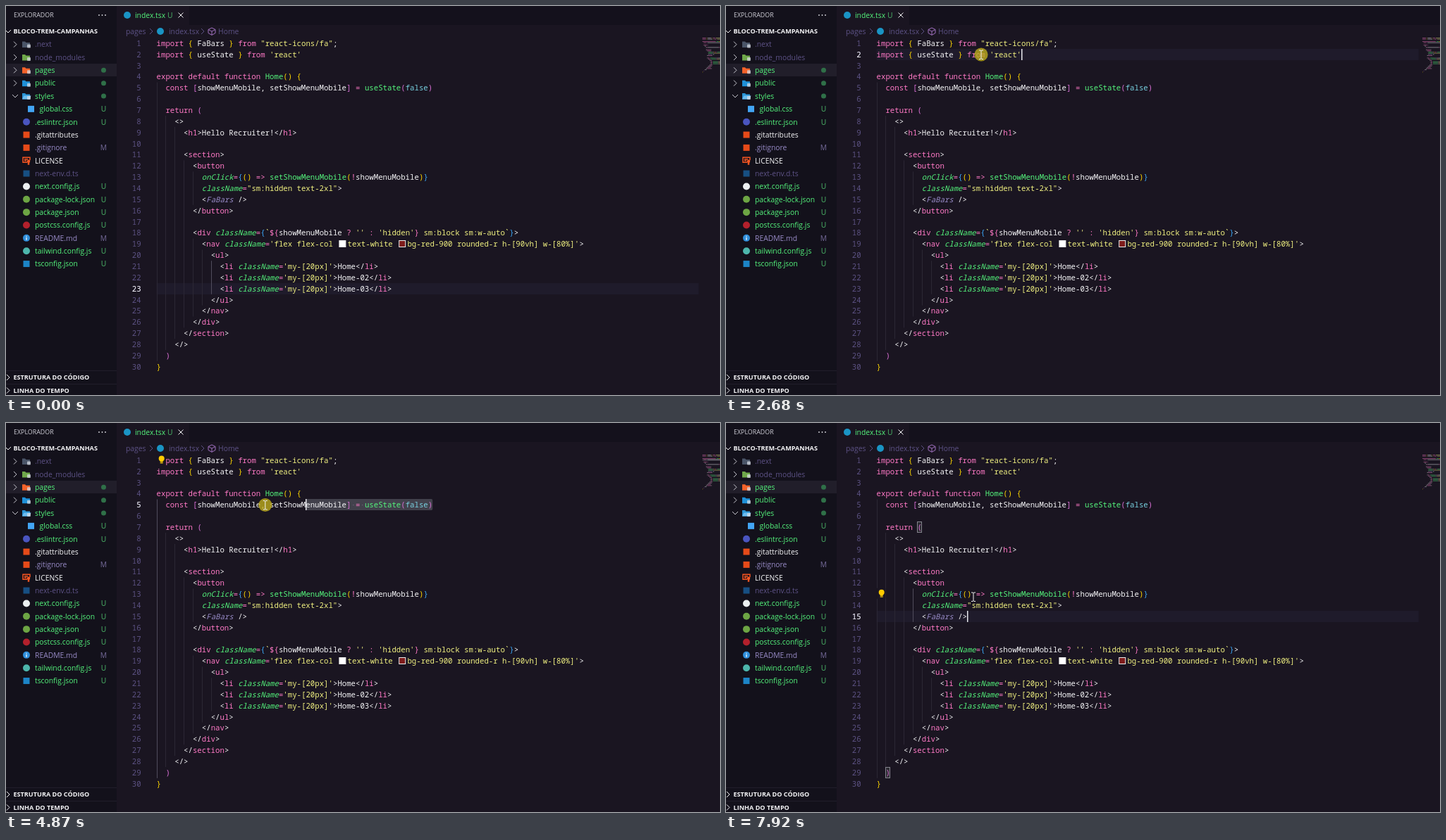
Write an HTML page that moves like this. It is 1013 px wide and 553 px high and loops after 7990 ms.

```html
<!DOCTYPE html>
<html lang="pt">
<head>
<meta charset="utf-8">
<style>
html, body { margin: 0; width: 100%; height: 100%; overflow: hidden; background: #1a1521; }
svg { display: block; width: 1013px; height: 553px; }
text { white-space: pre; font: 10.35px "Open Sans", "Noto Sans", sans-serif; }
.code { font: 500 10.7px "Noto Sans Mono", "DejaVu Sans Mono", monospace; }
.italic { font-style: italic; }
.head { font-size: 9.1px; font-weight: 700; }
.small { font-size: 8.9px; }
</style>
</head>
<body>
<svg id="stage" viewBox="0 0 1013 553"></svg>
<!-- Each ~ starts a token; the letter after it is its colour. -->
<script type="text/plain" id="code">~pimport ~1{ ~wFaBars ~1} ~pfrom ~y"react-icons/fa"~w;
~pimport ~1{ ~wuseState ~1} ~pfrom ~y'react'

~pexport default function ~gHome~1() {
  ~pconst ~2[~wshowMenuMobile, setShowMenuMobile~2] ~p= ~guseState~2(~bfalse~2)

  ~preturn ~2(
    ~w<>
      ~w<~ph1~w>Hello Recruiter!</~ph1~w>

      ~w<~psection~w>
        ~w<~pbutton
          ~aonClick~p=~3{~1() ~p=> ~gsetShowMenuMobile~1(~p!~wshowMenuMobile~1)~3}
          ~aclassName~p=~y"sm:hidden text-2xl"~w>
          ~w<~cFaBars ~w/>
        ~w</~pbutton~w>

        ~w<~pdiv ~aclassName~p=~3{~y`~p${~wshowMenuMobile ~p? ~y'' ~p: ~y'hidden'~p} ~ysm:block sm:w-auto`~3}~w>
          ~w<~pnav ~aclassName~p=~y'flex flex-col ~W~ytext-white ~R~ybg-red-900 rounded-r h-[90vh] w-[80%]'~w>
            ~w<~pul~w>
              ~w<~pli ~aclassName~p=~y'my-[20px]'~w>Home</~pli~w>
              ~w<~pli ~aclassName~p=~y'my-[20px]'~w>Home-02</~pli~w>
              ~w<~pli ~aclassName~p=~y'my-[20px]'~w>Home-03</~pli~w>
            ~w</~pul~w>
          ~w</~pnav~w>
        ~w</~pdiv~w>
      ~w</~psection~w>
    ~w</>
  ~2)
~1}</script>
<script>
const LOOP = 7990, LAG = 160;
const LEFT = 213.6, CHAR = 6.42, TOP = 53, ROW = 15.86;
const EDITOR = '#1a1521', SIDE = '#13111b', DIM = '#5d5286', GREEN = '#54f47c', STATUS = '#4cb869', WHITE = '#f4f4f6';
const COLORS = { p: '#ff79c6', w: WHITE, y: '#f0f080', g: GREEN, a: GREEN, b: '#78d1e1', c: '#988bc7',
  1: '#ffd700', 2: '#da70d6', 3: '#3aa6f5' };
const SWATCHES = { W: '#ffffff', R: '#7f1d1d' };

const lines = document.getElementById('code').textContent.split('\n');
const plain = lines.map(line => line.replace(/~./g, ''));
const colX = col => LEFT + col * CHAR;
const rowY = line => TOP + (line - 1) * ROW;

const rect = (x, y, w, h, fill, extra = '') =>
  `<rect x="${x}" y="${y}" width="${w}" height="${h}" fill="${fill}" ${extra}/>`;
const rowRect = (x, line, w, fill, extra) => rect(x, Math.round(rowY(line) - 8), w, 16, fill, extra);
const circle = (x, y, r, fill, extra = '') => `<circle cx="${x}" cy="${y}" r="${r}" fill="${fill}" ${extra}/>`;
const stroke = (d, color, width = 1) => `<path d="${d}" fill="none" stroke="${color}" stroke-width="${width}"/>`;
const text = (x, y, str, fill, cls = '', extra = '') =>
  `<text x="${x}" y="${Math.round(y + 3.8)}" fill="${fill}" class="${cls}" ${extra}>${str.replace(/&/g, '&amp;').replace(/</g, '&lt;')}</text>`;
const chevron = (x, y, color, down) =>
  stroke(down ? `M${x - 4} ${y - 2}l4 4l4 -4` : `M${x - 2} ${y - 4}l4 4l-4 4`, color);
const number = (line, color) => text(191.7, rowY(line), String(line), color, 'code', 'text-anchor="end"');

// Sidebar: label, label colour, icon kind, icon colour, git state
const tree = [
  ['.next', DIM, 'folder', '#4a5568'],
  ['node_modules', DIM, 'folder', '#6fa84a'],
  ['pages', GREEN, 'folder', '#f4622a', '•'],
  ['public', GREEN, 'folder', '#1e90d8', '•'],
  ['styles', GREEN, 'open', '#2b95d6', '•'],
  ['global.css', GREEN, 'square', '#42a5f5', 'U'],
  ['.eslintrc.json', GREEN, 'circle', '#4a55c0', 'U'],
  ['.gitattributes', WHITE, 'square', '#e64a19'],
  ['.gitignore', '#988bc7', 'square', '#e64a19', 'M'],
  ['LICENSE', WHITE, 'award', '#ff5722'],
  ['next-env.d.ts', DIM, 'square', '#174f82'],
  ['next.config.js', GREEN, 'circle', '#eceff1', 'U'],
  ['package-lock.json', GREEN, 'circle', '#6da544', 'U'],
  ['package.json', GREEN, 'circle', '#6da544', 'U'],
  ['postcss.config.js', GREEN, 'circle', '#b3202c', 'U'],
  ['README.md', '#988bc7', 'info', '#2f8fdc', 'M'],
  ['tailwind.config.js', GREEN, 'circle', '#4db6ac', 'U'],
  ['tsconfig.json', GREEN, 'square', '#1c84c6', 'U']
];

function icon(kind, x, y, color) {
  if (kind === 'square') return rect(x - 4.5, y - 4.5, 9, 9, color);
  if (kind === 'circle') return circle(x, y, 5, color);
  if (kind === 'info') return circle(x, y, 5, color) + rect(x - .6, y - 1, 1.2, 4, '#fff') + rect(x - .6, y - 3, 1.2, 1.2, '#fff');
  if (kind === 'award') return stroke(`M${x + 1} ${y + 2.5}h-6v-7h10v4M${x - 3} ${y - 2}h5M${x - 3} ${y}h3`, color, 1.4) +
    circle(x + 3, y + 1, 2.2, color) + rect(x + 1.8, y + 2, 2.4, 4, color);
  const folder = `<path d="M${x - 6} ${y - 4}h4l1.5 1.5h5.5v7h-11z" fill="${color}"/>`;
  const front = kind === 'open' ? `<path d="M${x - 6} ${y + 4.5}l2.5 -5h10l-2 5z" fill="#6dbdf0"/>` : '';
  return folder + front + rect(x + 1, y, 5, 5, '#d8dde6', 'opacity=".75" rx="1"');
}

function sidebar() {
  let out = rect(0, 0, 157, 553, SIDE) + rect(0, 82, 157, 18, '#211e2a') +
    text(11, 12.5, 'EXPLORADOR', '#d0d0d8', 'small') + [132, 136.5, 141].map(x => circle(x, 13, .9, '#d8d8df')).join('') +
    chevron(3, 36, WHITE, true) + text(10.5, 35.5, 'BLOCO-TREM-CAMPANHAS', WHITE, 'head') +
    rect(0, 518, 157, 1, '#211e2b') + rect(0, 537, 157, 1, '#211e2b') +
    chevron(3, 528, WHITE) + text(10.5, 527.5, 'ESTRUTURA DO CÓDIGO', WHITE, 'head') +
    chevron(3, 546.5, WHITE) + text(10.5, 546, 'LINHA DO TEMPO', WHITE, 'head');
  tree.forEach(([label, color, kind, tint, git], i) => {
    const y = 54.6 + i * 18.35, nested = i === 5 ? 6.5 : 0;
    if (i < 5) out += chevron(13, y, '#c8c8d0', i === 4);
    out += icon(kind, 29 + nested, y, tint) + text(41 + nested, y, label, color);
    if (git === '•') out += circle(138.5, y, 3.5, '#2f7048');
    else if (git) out += text(138.5, y, git, git === 'U' ? STATUS : '#746a99', '', 'text-anchor="middle"');
  });
  return out;
}

function header() {
  return rect(157, 0, 856, 27, '#14111c') + rect(157, 0, 103, 27, EDITOR) +
    circle(172, 13, 5, '#1a94c4') + text(183, 13, 'index.tsx', GREEN) + text(229, 13, 'U', STATUS) +
    stroke('M244.5 9.5l7 7m0 -7l-7 7', WHITE) +
    text(170, 36, 'pages', DIM) + chevron(206, 36, DIM) + circle(219, 36, 5, '#1a94c4') +
    text(231, 36, 'index.tsx', DIM) + chevron(279, 36, DIM);
}

function codeText() {
  let out = '', map = '';
  lines.forEach((line, i) => {
    const y = rowY(i + 1), parts = line.split('~');
    let x = LEFT + parts[0].length * CHAR, mapCol = parts[0].length;
    out += number(i + 1, '#5c5283');
    for (const part of parts.slice(1)) {
      const key = part[0], str = part.slice(1);
      if (SWATCHES[key]) {
        out += rect(x + 2.5, Math.round(y) - 4.5, 9, 9, SWATCHES[key], 'stroke="#eee"');
        x += 14.2;
        continue;
      }
      out += text(x, y, str, COLORS[key], 'code' + ('ac'.includes(key) ? ' italic' : ''));
      map += rect(988 + mapCol * .83, 45 + i * 1.67, str.trim().length * .83, 1, COLORS[key], 'opacity=".45"');
      x += str.length * CHAR;
      mapCol += str.length;
    }
  });
  return out + map;
}

// Pointer path: time, x, y
const path = [
  [250, 688, 465], [700, 446, 216], [1000, 553, 265], [1400, 296, 180], [1810, 330, 58], [2160, 424, 64],
  [2280, 424, 64], [2400, 424, 69], [2520, 424, 69], [3060, 216, 69], [3370, 216, 69], [3750, 420, 135],
  [4110, 660, 130], [4270, 612, 117], [4460, 518, 117], [5270, 222, 116], [5980, 222, 116], [6520, 312, 211],
  [6660, 312, 211], [6860, 293, 252], [7080, 346, 275], [7140, 346, 275], [7420, 278, 243], [7520, 278, 243],
  [7660, 346, 275], [7770, 346, 275], [7920, 351, 247], [7990, 351, 247]
];
const presses = [[2420, 3420], [4270, 5650], [6560, 6650], [7120, 7480], [7680, 7760]];
const bulbs = [[3500, 5650, 1], [5650, 6560, 4], [7540, LOOP, 13]];
const guides = [[0, 5, 29], [2, 8, 28], [4, 9, 27], [6, 12, 26], [8, 13, 15], [8, 19, 25], [10, 20, 24], [12, 21, 23]];

function pointer(t) {
  const i = Math.max(1, path.findIndex(p => p[0] >= t));
  const [t0, x0, y0] = path[i - 1], [t1, x1, y1] = path[i];
  const k = Math.max(0, (t - t0) / (t1 - t0));
  return [x0 + (x1 - x0) * k, y0 + (y1 - y0) * k];
}

function textPosition([x, y]) {
  const line = Math.round((y - TOP) / ROW) + 1;
  const col = Math.max(0, Math.min(plain[line - 1].length, Math.round((x - LEFT) / CHAR)));
  return { line, col };
}

function caretState(t) {
  const press = presses.filter(p => p[0] <= t).pop();
  if (!press) return { caret: { line: 23, col: 52 }, anchor: { line: 23, col: 52 }, visible: false };
  const [down, up] = press;
  return {
    anchor: textPosition(pointer(down)),
    caret: textPosition(pointer(Math.max(down, Math.min(t - LAG, up)))),
    visible: true, pressed: t < up
  };
}

function selection(a, b) {
  const [from, to] = a.line < b.line || (a.line === b.line && a.col < b.col) ? [a, b] : [b, a];
  let out = '';
  for (let line = from.line; line <= to.line; line++) {
    const start = line === from.line ? from.col : 0;
    const end = line === to.line ? to.col : plain[line - 1].length + 1;
    out += rowRect(colX(start), line, (end - start) * CHAR, '#42414c', 'rx="2"') +
      rect(988, 45 + (line - 1) * 1.67, 25, 1.67, '#42414c');
    for (let col = start; col < end; col++)
      if (plain[line - 1][col] === ' ') out += rect(colX(col) + 2.7, rowY(line) - .3, 1, 1, '#77748a');
  }
  return out;
}

const box = (line, col) =>
  rect(Math.round(colX(col)) + .5, Math.round(rowY(line)) - 7.5, 6, 15, '#2a2a30', 'stroke="#85838e"');

function bulb(line) {
  const y = rowY(line) - 2.5;
  return rect(LEFT, y - 6, 12.8, 15, EDITOR) + circle(220.7, y, 4, '#ffcc00') +
    rect(218.7, y + 2.5, 4, 2.5, '#ffcc00') + rect(218.7, y + 5.5, 4, 1.5, '#d5ac12');
}

function render(t) {
  const { caret, anchor, visible, pressed } = caretState(t);
  const selected = caret.line !== anchor.line || caret.col !== anchor.col;
  const active = guides.filter(([, from, to]) => from - 1 <= caret.line && caret.line <= to).pop();

  let below = selected ? selection(anchor, caret) : rowRect(LEFT, caret.line, 769, '#1f1b2b');
  for (const guide of guides) {
    const [col, from, to] = guide;
    below += rect(Math.round(colX(col)), rowY(from) - 8, 1, (to - from + 1) * ROW, guide === active ? '#504c5c' : '#2b2734');
  }
  if (t >= 4270 && t < 4700) below += box(5, 54) + box(5, 60);
  if (t >= 6560 && !selected) below += box(7, 9) + box(29, 2);

  let above = number(caret.line, WHITE);
  if (t >= 3500 && t < 4800) above += text(285, 36, '...', DIM);
  else above += stroke('M292 31l5 2.5v5l-5 2.8l-5 -2.8v-5zm-5 2.5l5 2.6l5 -2.6m-5 2.6v5.2', '#a070c0') + text(301, 36, 'Home', DIM);
  for (const [from, to, line] of bulbs) if (t >= from && t < to) above += bulb(line);
  if (visible) above += rowRect(Math.round(colX(caret.col)), caret.line, 1.5, '#e8e8ee');
  if (t >= 250) {
    const [x, y] = pointer(t);
    if (pressed) above += circle(x, y, 9.6, '#c2b01c', 'opacity=".78"');
    above += stroke(`M${x - 3} ${y - 6}h2.2l.8 .8l.8 -.8h2.2M${x} ${y - 5.5}v11.5M${x - 3} ${y + 6.5}h2.2l.8 -.8l.8 .8h2.2`, '#f4f4f4');
  }
  under.innerHTML = below;
  over.innerHTML = above;
}

document.getElementById('stage').innerHTML = rect(0, 0, 1013, 553, EDITOR) + sidebar() + header() +
  '<g id="under"></g>' + codeText() + '<g id="over"></g>';
const under = document.getElementById('under'), over = document.getElementById('over');
const start = performance.now();

function frame() {
  render((performance.now() - start) % LOOP);
  requestAnimationFrame(frame);
}
frame();
</script>
</body>
</html>
```
